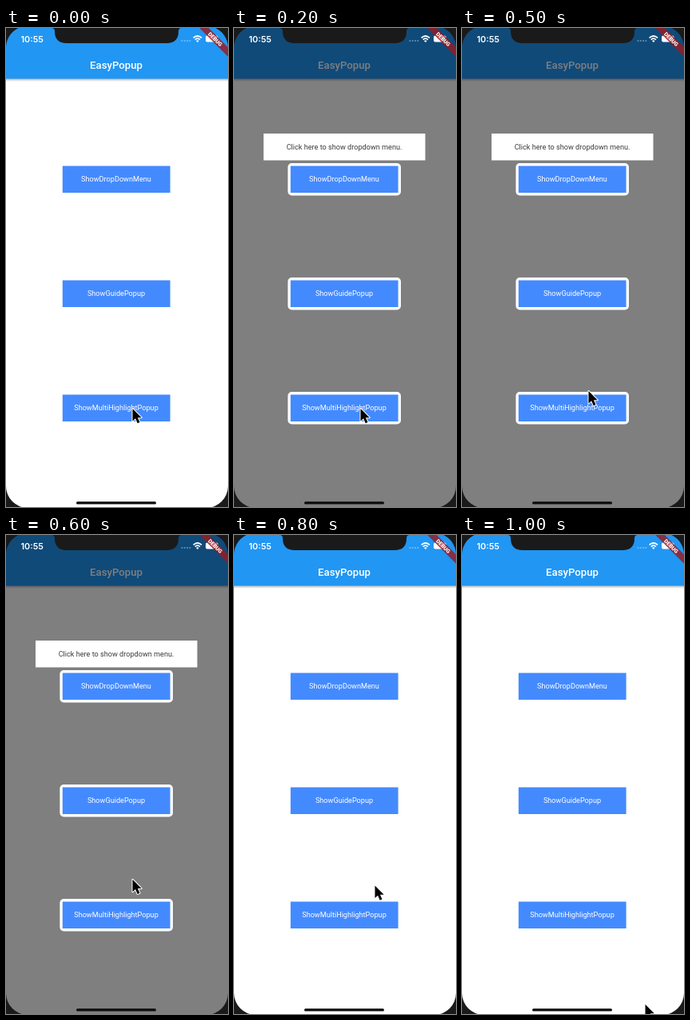
Write an HTML page that moves like this. It is 278 px wide and 599 px high and loops after 1100 ms.

```html
<!DOCTYPE html>
<html lang="en">
<head>
<meta charset="utf-8">
<title>Popup demo</title>
<style>
  html, body { margin: 0; width: 100%; height: 100%; overflow: hidden; background: #fff; }
  svg { display: block; width: 278px; height: 599px; }
  text { font-family: Roboto, "Open Sans", sans-serif; font-size: 9.15px; text-anchor: middle; fill: #fff; }
  .title { font-size: 13.2px; font-weight: 500; }
  .clock { font-family: Inter, sans-serif; font-size: 10.8px; font-weight: 600; text-anchor: start; }
  .banner { font-size: 6.8px; font-weight: 900; }
  .hint { fill: #3a3a3a; }
</style>
</head>
<body>
<svg viewBox="0 0 278 599">
  <defs>
    <linearGradient id="shade" x2="0" y2="1">
      <stop stop-opacity=".3"/>
      <stop offset="1" stop-opacity="0"/>
    </linearGradient>
  </defs>

  <rect width="278" height="599" fill="#fff"/>
  <rect y="63" width="278" height="4" fill="url(#shade)"/>
  <rect width="278" height="63.5" fill="#2196f3"/>
  <text class="title" x="138" y="51">EasyPopup</text>
  <g id="buttons"></g>

  <path id="dim" fill-rule="evenodd"/>
  <g id="popup">
    <rect x="37" y="132" width="202.5" height="33.5" fill="#fff"/>
    <text class="hint" x="138" y="152">Click here to show dropdown menu.</text>
  </g>

  <!-- status bar -->
  <text class="clock" x="18.5" y="17.5">10:55</text>
  <g fill="#fff">
    <path d="M219.5 16h12" stroke="#fff" stroke-width="1.6" stroke-dasharray="1.8 1.5" opacity=".45"/>
    <g fill="none" stroke="#fff" stroke-width="1.7">
      <path d="M234.6 12.4Q239.8 7.6 245 12.4"/>
      <path d="M236.7 14.6Q239.8 11.8 242.9 14.6"/>
    </g>
    <path d="M238 16.1Q239.8 14.6 241.6 16.1L239.8 18z"/>
    <rect x="250" y="9.5" width="15.5" height="8" rx="2"/>
  </g>

  <!-- corner ribbon -->
  <g transform="translate(262 14) rotate(45)">
    <rect x="-40" y="-4" width="80" height="8" fill="#000" opacity=".2"/>
    <rect x="-40" y="-4" width="80" height="8" fill="#a01d24" opacity=".78"/>
    <text class="banner" y="2.4">DEBUG</text>
  </g>

  <!-- device frame -->
  <path fill="#1a1a1a" fill-rule="evenodd" d="M0 0H278V599H0z
    M0 24A27 27 0 0 1 18 -1H260A27 27 0 0 1 278 24V573A27 27 0 0 1 251 600H27A27 27 0 0 1 0 573z"/>
  <path fill="#1a1a1a" d="M57 0Q61 0 61 4Q61 19 76 19H201Q216 19 216 4Q216 0 220 0z"/>
  <rect x="88" y="592.3" width="100" height="3.2" rx="1.6" fill="#0c0c0c"/>

  <path id="cursor" fill="#000" stroke="#fff" stroke-width="2" stroke-linejoin="round" paint-order="stroke"
    d="M0 0V15.6L3.6 12.3L6.2 18.2L9 17L6.4 11.2H11.2z"/>
</svg>
<script>
  const LOOP = 1100, STEP = 100;
  const SHOW_AT = 100, HIDE_AT = 800;
  const byId = id => document.getElementById(id);

  const buttons = [
    ["ShowDropDownMenu", 172.5],
    ["ShowGuidePopup", 315.5],
    ["ShowMultiHighlightPopup", 458.5],
  ];

  // [time, x, y] of the pointer tip
  const pointerPath = [
    [0, 158.5, 476], [300, 158.5, 476], [400, 158.5, 470], [500, 158.5, 454],
    [700, 158.5, 407.5], [800, 176.5, 438.5], [900, 204, 505], [1000, 229.5, 587],
  ];

  const roundHole = (x, y, w, h, r) =>
    `M${x + r} ${y}h${w - 2 * r}a${r} ${r} 0 0 1 ${r} ${r}v${h - 2 * r}` +
    `a${r} ${r} 0 0 1 ${-r} ${r}h${2 * r - w}a${r} ${r} 0 0 1 ${-r} ${-r}` +
    `v${2 * r - h}a${r} ${r} 0 0 1 ${r} ${-r}z`;

  byId("buttons").innerHTML = buttons.map(([label, y]) =>
    `<rect x="70.8" y="${y}" width="134.8" height="33.5" fill="#448aff"/>
     <text x="138" y="${y + 19.7}">${label}</text>`).join("");

  byId("dim").setAttribute("d", "M0 0H278V599H0z" +
    buttons.map(([, y]) => roundHole(67.4, y - 3.4, 141.6, 40.3, 5)).join(""));

  function pointerAt(t) {
    const next = pointerPath.findIndex(([time]) => time > t);
    if (next < 0) return pointerPath.at(-1).slice(1);
    const [t0, x0, y0] = pointerPath[next - 1];
    const [t1, x1, y1] = pointerPath[next];
    const k = (t - t0) / (t1 - t0);
    return [x0 + (x1 - x0) * k, y0 + (y1 - y0) * k];
  }

  function draw(t) {
    const open = t >= SHOW_AT && t < HIDE_AT;
    byId("dim").setAttribute("opacity", !open ? 0 : t < SHOW_AT + STEP ? 0.16 : 0.5);
    byId("popup").setAttribute("visibility", open ? "visible" : "hidden");
    byId("cursor").setAttribute("transform", `translate(${pointerAt(t)})`);
  }

  const start = performance.now();
  function tick() {
    const t = (performance.now() - start) % LOOP;
    draw(Math.floor(t / STEP) * STEP);
    requestAnimationFrame(tick);
  }
  tick();
</script>
</body>
</html>
```
